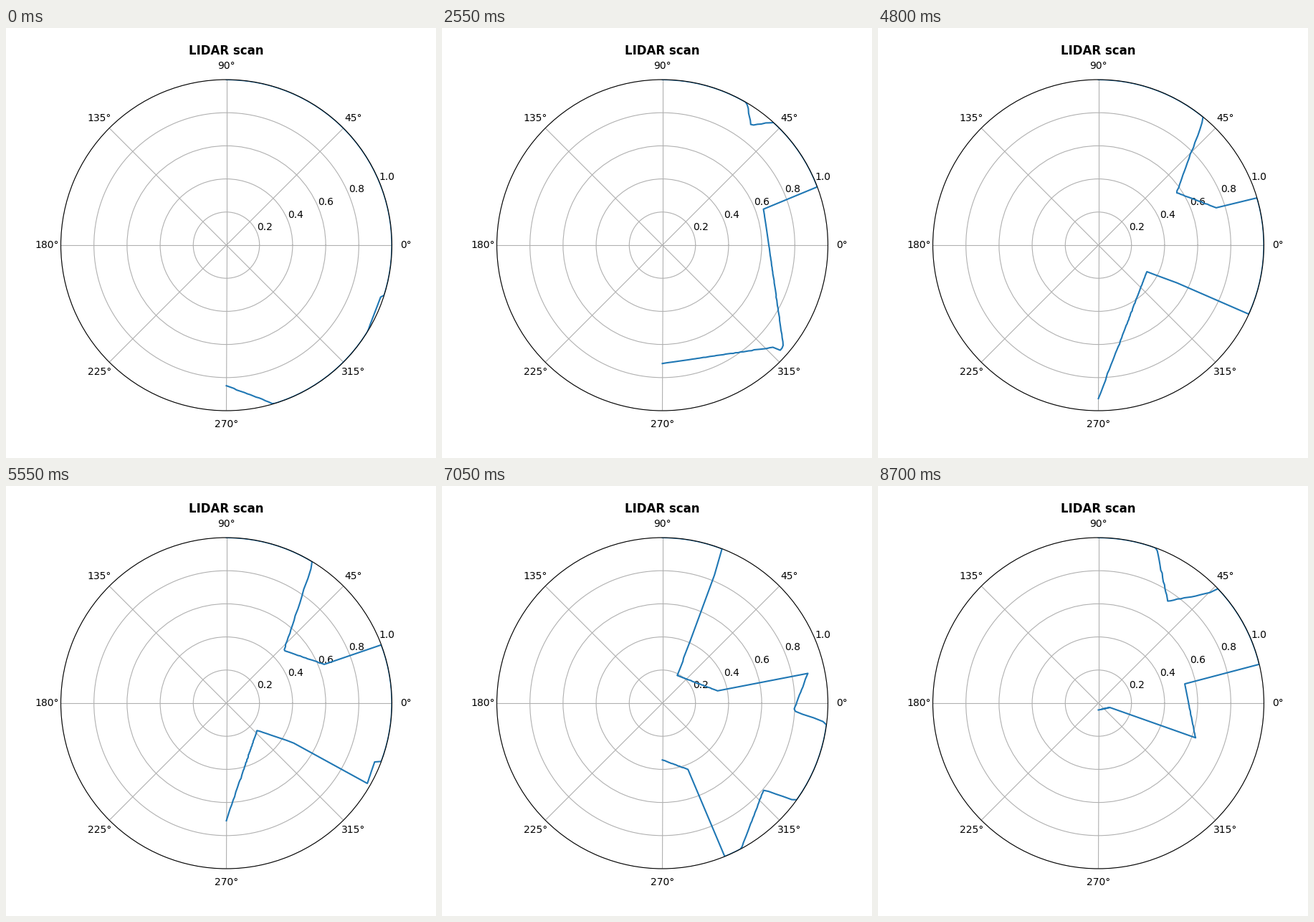
Recreate the animation shown at these times as a matplotlib script. Size 600x600 px, loop 8.85 s.

```python
import numpy as np
import matplotlib.pyplot as plt
from matplotlib.animation import FuncAnimation

FRAMES, INTERVAL = 59, 150

# World geometry, in world units with y pointing down
GROUND_Y = 512 * 0.79
PIPE_W, PIPE_H, GAP = 52, 320, 100
PIPES = [(288, 140.9), (432, 130.9)]  # left edge at start, top of the gap
SPEED = 4
SENSOR_X, START_Y = 91, 256
REACH = 288 * 0.8 - 34
RAYS = 180

FLAPS = {22, 28, 39}
MAX_TILT = 20


def fly():
    """Height and tilt of the flyer for every frame."""
    y, vel, rot = START_Y, -9, 45
    poses = []
    for n in range(FRAMES):
        if n in FLAPS:
            vel, rot = -9, 45
        else:
            vel, rot = min(vel + 1, 10), rot - 3
        y += vel
        poses.append((y, min(rot, MAX_TILT)))
    return poses


def outcode(x, y, rect):
    left, top, right, bottom = rect
    code = 1 if x < left else 2 if x > right else 0
    return code | (4 if y < top else 8 if y > bottom else 0)


def clip_end(x1, y1, x2, y2, code, rect):
    """Move (x1, y1) along the line to the rectangle side it lies beyond."""
    left, top, right, bottom = rect
    if code & 12:
        y = top if code & 4 else bottom
        return x1 + int((x2 - x1) * (y - y1) / (y2 - y1)), y
    x = left if code & 1 else right
    return x, y1 + int((y2 - y1) * (x - x1) / (x2 - x1))


def first_hit(line, rect):
    """Integer Cohen-Sutherland clipping; the entry point or None."""
    x1, y1, x2, y2 = line
    a, b = outcode(x1, y1, rect), outcode(x2, y2, rect)
    while a or b:
        if a & b:
            return None
        if a:
            x1, y1 = clip_end(x1, y1, x2, y2, a, rect)
            a = outcode(x1, y1, rect)
        else:
            x2, y2 = clip_end(x2, y2, x1, y1, b, rect)
            b = outcode(x2, y2, rect)
    return x1, y1


def make_rect(x, y, w, h):
    x, y = int(x), int(y)
    return x, y, x + w - 1, y + h - 1


def scan(n):
    """Normalised distances, from straight up to straight down."""
    y0, tilt = POSES[n]
    shift = SPEED * (n + 1)
    ground = make_rect(-(shift % 48), GROUND_Y, 336, 112)
    pipes = []
    for x, gap_y in PIPES:
        pipes.append(make_rect(x - shift, gap_y - PIPE_H, PIPE_W, PIPE_H))
        pipes.append(make_rect(x - shift, gap_y + GAP, PIPE_W, PIPE_H))

    dist = np.empty(RAYS)
    for i in range(RAYS):
        a = np.radians(i - 90 - tilt)
        end = SENSOR_X + REACH * np.cos(a), y0 + REACH * np.sin(a)
        line = SENSOR_X, y0, int(end[0]), int(end[1])
        hit = next((p for p in (first_hit(line, r) for r in pipes) if p), None)
        if hit:
            hit = hit[0], min(hit[1], GROUND_Y)
        else:
            hit = first_hit(line, ground) or end
        dist[i] = np.hypot(hit[0] - SENSOR_X, hit[1] - y0)
    return np.minimum(dist / REACH, 1)


POSES = fly()
SCANS = [scan(n) for n in range(FRAMES)]

fig = plt.figure(figsize=(6, 6), dpi=100)
ax = fig.add_subplot(projection="polar")
ax.set_title("LIDAR scan", fontweight="bold")
ax.set_ylim(0, 1)
ax.set_yticks([0.2, 0.4, 0.6, 0.8, 1.0])
angles = np.linspace(np.pi / 2, -np.pi / 2, RAYS)
beam, = ax.plot(angles, SCANS[0])


def update(n):
    beam.set_ydata(SCANS[n])
    return beam,


anim = FuncAnimation(fig, update, frames=FRAMES, interval=INTERVAL,
                     repeat=True, repeat_delay=0)
plt.show()
```
